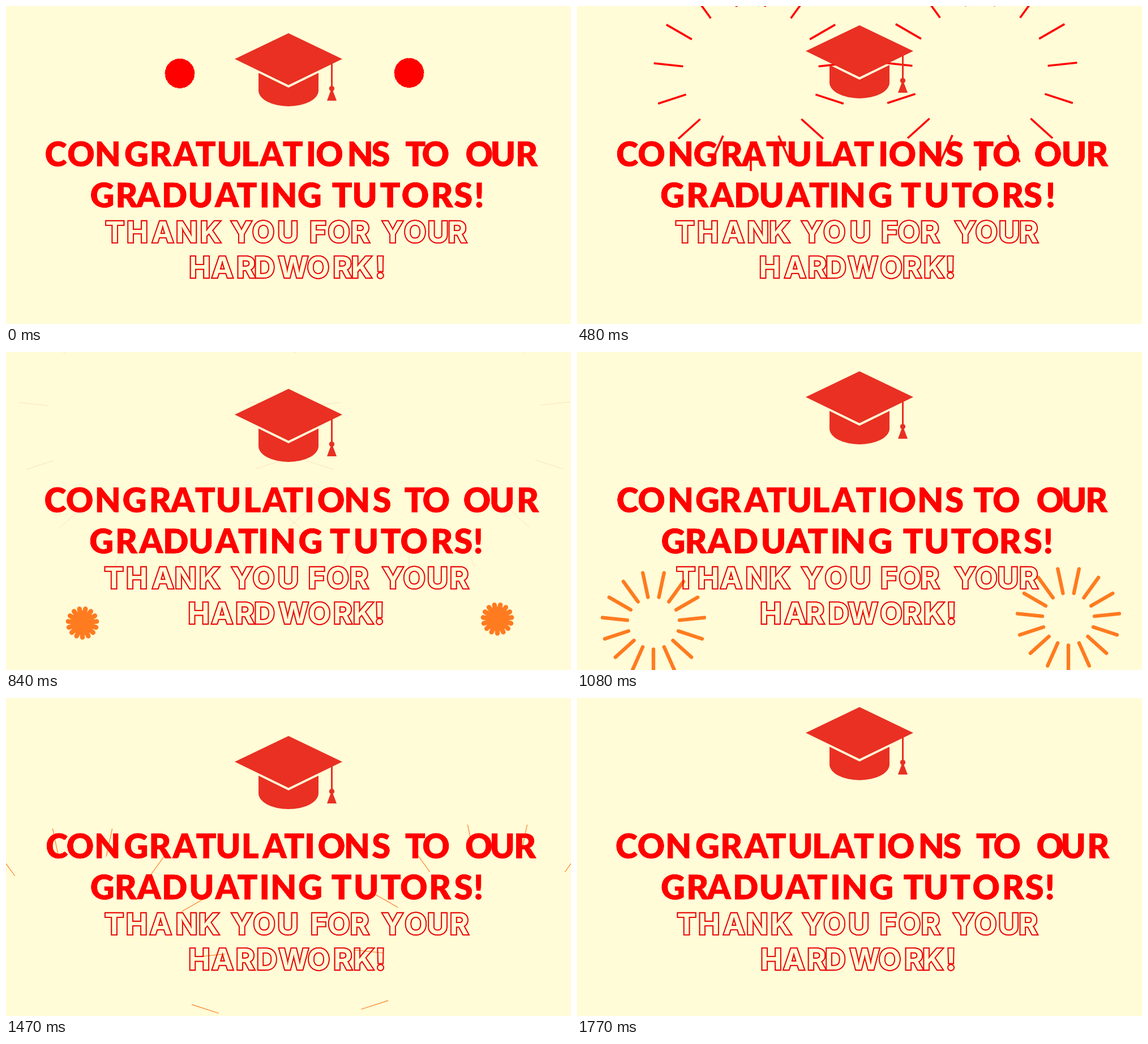
Write an HTML page with a canvas that moves like this. It is 998 by 561 pixels and loops after 1.8 s.

```html
<!DOCTYPE html>
<html lang="en">
<head>
<meta charset="utf-8">
<title>Congratulations</title>
<style>
  html, body { margin: 0; width: 100%; height: 100%; overflow: hidden; background: #fffcd7; }
  canvas { display: block; width: 998px; height: 561px; }
</style>
</head>
<body>
<canvas id="stage" width="998" height="561"></canvas>
<script>
const ctx = document.getElementById('stage').getContext('2d');
const W = 998, H = 561, LOOP = 1800, STEP = 30, TAU = Math.PI * 2;
const PAPER = '#fffcd7', RED = '#ff0000', CAP = '#e93023', ORANGE = '#ff7b20';

const SOLID = { font: '900 59.5px Lato, "Open Sans", sans-serif', color: RED, edge: 0.2 };
const HOLLOW = { font: '700 51px Inter, Roboto, sans-serif', color: '#ea0a0a', edge: 2.1, hollow: true };

// text, style, left ink edge, right ink edge, baseline
const WORDS = [
  ['CONGRATULATIONS', SOLID, 69.5, 680, 282.6],
  ['TO', SOLID, 702, 781, 282.6],
  ['OUR', SOLID, 810, 940, 282.6],
  ['GRADUATING', SOLID, 148, 555, 355.2],
  ['TUTORS!', SOLID, 574, 839, 355.2],
  ['THANK', HOLLOW, 174.5, 379, 416.7],
  ['YOU', HOLLOW, 395, 517, 416.7],
  ['FOR', HOLLOW, 536, 643, 416.7],
  ['YOUR', HOLLOW, 665, 817, 416.7],
  ['HARDWORK!', HOLLOW, 324, 667, 479.2]
];

let seed = 41;
function rand() {
  seed = (seed * 16807) % 2147483647;
  return seed / 2147483647;
}

// One letter as a 2x sprite; hollow letters keep only their rim.
function makeGlyph(ch, style) {
  const c = document.createElement('canvas');
  c.width = c.height = 200;
  const g = c.getContext('2d');
  g.scale(2, 2);
  g.font = style.font;
  g.fillStyle = g.strokeStyle = style.color;
  g.lineWidth = style.edge * 2;
  g.miterLimit = 3;
  g.strokeText(ch, 20, 70);
  if (style.hollow) g.globalCompositeOperation = 'destination-out';
  g.fillText(ch, 20, 70);
  return c;
}

function layWord([text, style, left, right, y]) {
  ctx.font = style.font;
  const width = s => ctx.measureText(s).width;
  const last = text.length - 1;
  const pos = [...text].map((ch, i) => width(text.slice(0, i + 1)) - width(ch));
  const inkL = -ctx.measureText(text[0]).actualBoundingBoxLeft - style.edge;
  const inkR = pos[last] + ctx.measureText(text[last]).actualBoundingBoxRight + style.edge;
  const track = (right - left - (inkR - inkL)) / last;
  return [...text].map((ch, i) => ({
    img: makeGlyph(ch, style),
    x: left - inkL + pos[i] + track * i,
    y,
    amp: 1.5 + rand() * 1.5,
    turns: 3 + Math.floor(rand() * 4),
    phase: rand() * TAU
  }));
}
const letters = WORDS.flatMap(layWord);

function drawText(t) {
  for (const l of letters) {
    const dx = l.amp * Math.sin(TAU * l.turns * t / LOOP + l.phase);
    ctx.drawImage(l.img, l.x + dx - 20, l.y - 70, 100, 100);
  }
}

// Fifteen rays fly outwards with a sine ease while they thin out.
function burst(cx, cy, age, color, cap, reach, weight) {
  const p = age / 930;
  if (p < 0 || p >= 1) return;
  const e = (1 - Math.cos(Math.PI * p)) / 2;
  const mid = 264 * e, w = weight * (1 - e);
  const half = cap === 'round' ? reach - w / 2 : reach;
  ctx.strokeStyle = color;
  ctx.lineWidth = w;
  ctx.lineCap = cap;
  ctx.beginPath();
  for (let i = 0; i < 15; i++) {
    const a = Math.PI / 2 + i * TAU / 15, c = Math.cos(a), s = Math.sin(a);
    ctx.moveTo(cx + c * (mid - half), cy + s * (mid - half));
    ctx.lineTo(cx + c * (mid + half), cy + s * (mid + half));
  }
  ctx.stroke();
}

function poly(...pts) {
  ctx.beginPath();
  for (let i = 0; i < pts.length; i += 2) ctx.lineTo(pts[i], pts[i + 1]);
  ctx.fill();
}

// Slow drop for half a beat, then a faster rise and a jump back.
function capTop(t) {
  const p = t % 600;
  return p < 300 ? 48 + p * 0.0708 : 70 - (p - 300) * 0.2;
}

function drawCap(top) {
  ctx.save();
  ctx.translate(499, top);
  ctx.fillStyle = CAP;
  poly(0, 0, 95, 45.5, 0, 91.5, -95, 45.5);
  ctx.beginPath();
  ctx.moveTo(-53, 70);
  ctx.lineTo(0, 96);
  ctx.lineTo(53, 70);
  ctx.lineTo(53, 101);
  ctx.ellipse(0, 101, 53, 28, 0, 0, Math.PI);
  ctx.fill();
  ctx.fillRect(75, 53, 3, 42);
  ctx.beginPath();
  ctx.arc(76.4, 97.6, 4.7, 0, TAU);
  ctx.fill();
  poly(74.6, 101, 78.2, 101, 85, 118.9, 68, 118.9);
  ctx.restore();
}

function draw(t) {
  ctx.fillStyle = PAPER;
  ctx.fillRect(0, 0, W, H);
  const redAge = (t + 17) % LOOP, orangeAge = t - 764;
  burst(307, 119, redAge, RED, 'butt', 26, 8);
  burst(712, 118, redAge, RED, 'butt', 26, 8);
  burst(135, 478, orangeAge, ORANGE, 'round', 25.2, 8.6);
  burst(868, 471, orangeAge, ORANGE, 'round', 25.2, 8.6);
  drawCap(capTop(t));
  drawText(t);
}

const start = performance.now();
function frame() {
  const t = (performance.now() - start) % LOOP;
  draw(Math.floor(t / STEP) * STEP);
  requestAnimationFrame(frame);
}
frame();
</script>
</body>
</html>
```
